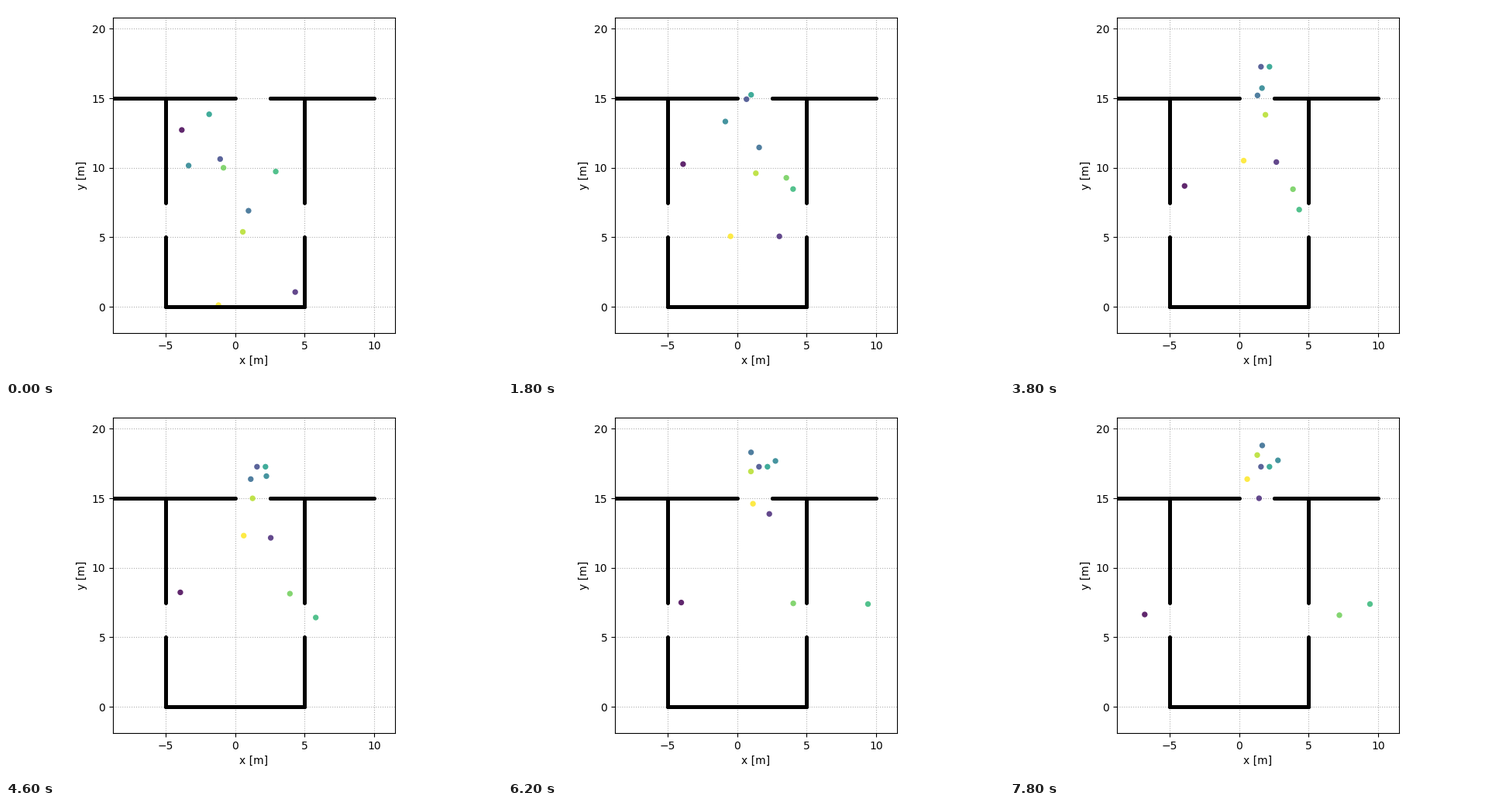
These frames come from a looping animation (640 by 480 pixels, 8000 ms). A matplotlib script:

```python
import numpy as np
import matplotlib.pyplot as plt
from matplotlib.animation import FuncAnimation

W, H, DPI = 640, 480, 100
FRAMES, INTERVAL = 40, 200
LAST = FRAMES - 1
SCALE = 17.935                              # pixels per metre
X0, Y0 = 295.7, 388.1                       # stage position of (0, 0)
LEFT, TOP, RIGHT, BOTTOM = 138, 15, 502, 422


def smooth(t, v, ts):
    """Shape-preserving cubic through (t, v), sampled at ts."""
    h = np.diff(t)
    d = np.diff(v) / h
    a, b = d[:-1], d[1:]
    mid = np.where(a * b > 0, 2 * a * b / np.where(a + b == 0, 1, a + b), 0)
    m = np.concatenate([d[:1], mid, d[-1:]])
    k = np.clip(np.searchsorted(t, ts, side="right") - 1, 0, len(h) - 1)
    s = (ts - t[k]) / h[k]
    return (v[k] * (1 + 2 * s) * (1 - s) ** 2
            + v[k + 1] * s ** 2 * (3 - 2 * s)
            + h[k] * m[k] * s * (1 - s) ** 2
            + h[k] * m[k + 1] * s ** 2 * (s - 1))


def walk(pace, approach, queue=(), leave=LAST, way_out=()):
    """Approach at a steady pace, drift in the queue until leave, walk out.

    Points are in metres, pace in metres per step.
    """
    pts = np.array([*approach, *queue, *way_out], float)
    legs = np.hypot(*np.diff(pts, axis=0).T) / pace
    n, q = len(approach) - 1, len(queue)
    if q:
        legs[n:n + q] = (leave - legs[:n].sum()) / q
    t = np.concatenate([[0], np.cumsum(legs)])
    if t[-1] < LAST:
        t, pts = np.append(t, LAST), np.vstack([pts, pts[-1]])
    steps = np.arange(FRAMES)
    return np.column_stack([smooth(t, c, steps) for c in pts.T])


tracks = [
    walk(0.50, [(-3.84, 12.72)],
         [(-3.90, 9.85), (-3.94, 8.34), (-4.06, 7.23)], 33,
         [(-4.81, 6.55), (-6.80, 6.64)]),
    walk(0.465, [(4.32, 1.06), (3.25, 3.19), (2.43, 13.33)],
         [(2.23, 14.11), (1.43, 15.00)]),
    walk(0.455, [(-1.08, 10.63), (-0.36, 12.32), (1.57, 17.27)]),
    walk(0.488, [(0.96, 6.91), (1.70, 13.21)],
         [(1.16, 15.98), (0.99, 18.24), (1.66, 18.80)]),
    walk(0.516, [(-3.35, 10.16), (-1.94, 12.32)],
         [(0.30, 14.31), (2.14, 16.40), (2.75, 17.68), (2.79, 17.73)]),
    walk(0.44, [(-1.87, 13.85), (0.14, 13.76), (1.69, 16.91), (2.18, 17.27)]),
    walk(0.51, [(2.92, 9.73), (3.61, 9.29)],
         [(4.09, 8.26), (4.37, 6.81)], 20,
         [(5.26, 6.40), (9.33, 7.28), (9.41, 7.39)]),
    walk(0.50, [(-0.84, 10.0), (1.73, 9.74), (3.53, 9.29)],
         [(3.90, 8.34), (4.06, 7.31)], 32,
         [(5.28, 6.42), (7.21, 6.59)]),
    walk(0.449, [(0.55, 5.39), (1.89, 13.81)],
         [(0.91, 15.67), (1.02, 17.18), (1.30, 18.11)]),
    walk(0.51, [(-1.20, 0.12), (0.88, 13.73)],
         [(1.19, 15.0), (0.58, 16.38)]),
]

fig = plt.figure(figsize=(W / DPI, H / DPI), dpi=DPI)
ax = fig.add_axes([LEFT / W, 1 - BOTTOM / H,
                   (RIGHT - LEFT) / W, (BOTTOM - TOP) / H])
ax.set_xlim((LEFT - X0) / SCALE, (RIGHT - X0) / SCALE)
ax.set_ylim((Y0 - BOTTOM) / SCALE, (Y0 - TOP) / SCALE)
ax.set_xticks(range(-5, 11, 5))
ax.set_yticks(range(0, 21, 5))
ax.set_xlabel("x [m]")
ax.set_ylabel("y [m]")
ax.grid(linestyle="dotted")
ax.set_axisbelow(True)

# Walls are dense rows of round dots
walls = [((-10, 0), (15, 15)), ((2.5, 10), (15, 15)), ((-5, 5), (0, 0))]
for side in (-5, 5):
    walls += [((side, side), (0, 5)), ((side, side), (7.5, 15))]
for xs, ys in walls:
    ax.plot(np.linspace(*xs, 200), np.linspace(*ys, 200), "o",
            color="black", markersize=2.5)

colors = plt.get_cmap("viridis")(np.linspace(0, 1, len(tracks)))
dots = [ax.add_patch(plt.Circle(track[0], 0.205, fc=color, lw=0, alpha=0.85))
        for track, color in zip(tracks, colors)]


def update(step):
    for dot, track in zip(dots, tracks):
        dot.center = track[step]
    return dots


anim = FuncAnimation(fig, update, frames=FRAMES, interval=INTERVAL,
                     repeat=True, repeat_delay=0)
plt.show()
```
